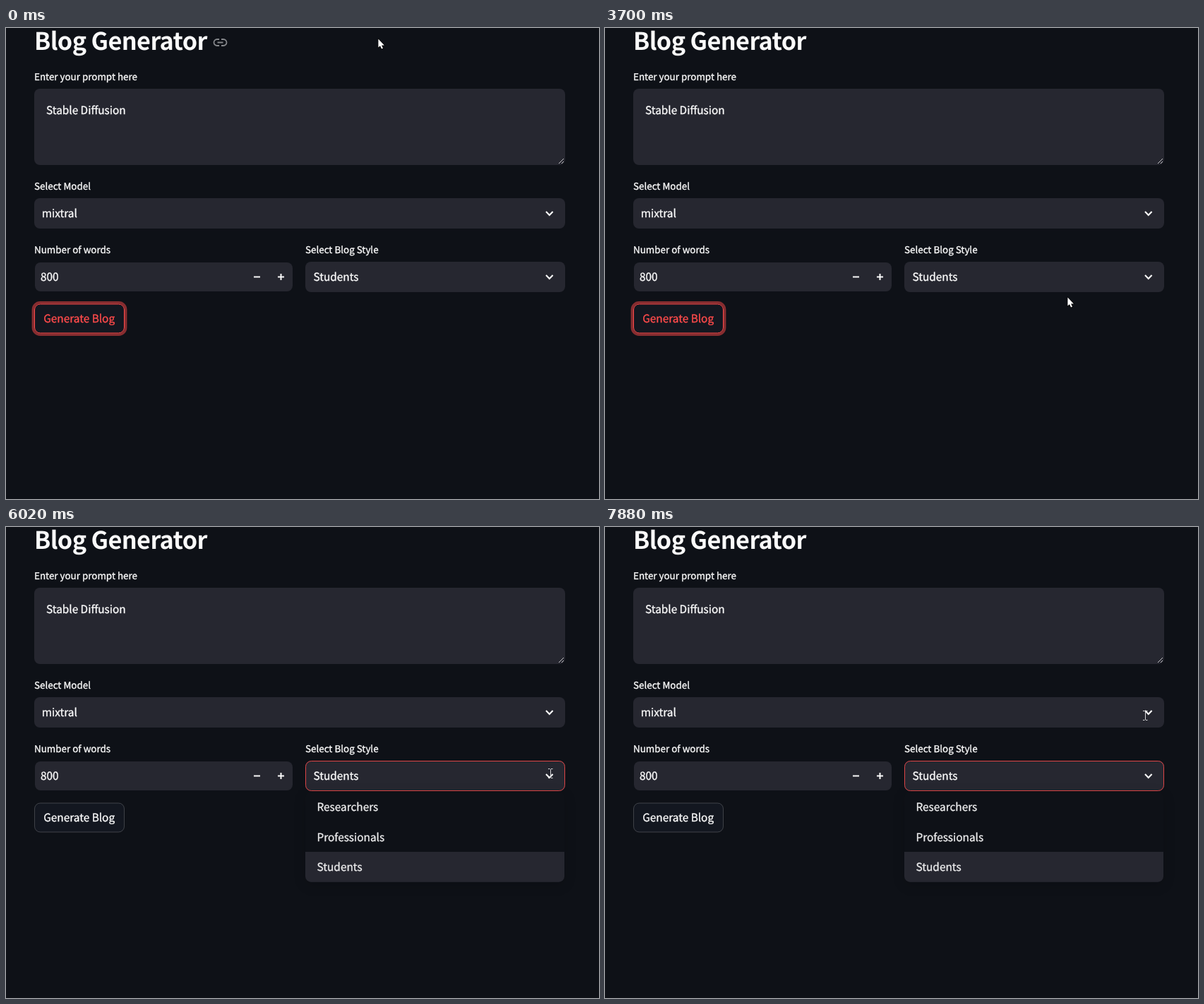
An HTML page with a canvas for the animation above (8 s loop, 840 by 667 pixels).

```html
<!DOCTYPE html>
<html lang="en">
<head>
<meta charset="utf-8">
<title>Blog Generator</title>
<style>
  html, body { margin: 0; width: 100%; height: 100%; overflow: hidden; background: #0e1117; }
  canvas { display: block; }
</style>
</head>
<body>
<canvas id="stage" width="840" height="667"></canvas>
<script>
const ctx = document.getElementById('stage').getContext('2d');
const LOOP = 8000, TICK = 66.25;
const BG = '#0e1117', FIELD = '#262730', WHITE = '#fafafa', RED = '#ff4b4b';
const FAMILY = '"Noto Sans CJK JP", "Noto Sans CJK SC", "Noto Sans CJK", "Open Sans", sans-serif';
const BODY = 15.36, LABEL = 13.42;
const LEFT = 40, RIGHT = 792, MIDDLE = 424, ROW = 43;
const OPEN = 82, CLICK = 95;

const prompt = { label: 'Enter your prompt here', value: 'Stable Diffusion', x: LEFT, y: 86, w: RIGHT - LEFT, h: 108, pad: 17 };
const model = { label: 'Select Model', value: 'mixtral', x: LEFT, y: 241, w: RIGHT - LEFT, h: ROW, pad: 10.8 };
const count = { label: 'Number of words', value: '800', x: LEFT, y: 331, w: 367, h: ROW, pad: 8.9, inset: 1 };
const style = { label: 'Select Blog Style', value: 'Students', x: MIDDLE, y: 331, w: RIGHT - MIDDLE, h: ROW, pad: 11.4 };
const fields = [prompt, model, count, style];

const HOME = { x: 527, y: 15 };
// Pointer moves in ticks; power above 1 slows down, below 1 speeds up
const MOVES = [
  { from: 2, to: 7, x: 940, y: 305, power: 0.7 },
  { from: 14, to: 18, x: 731, y: 322, power: 3 },
  { from: 21, to: 23, x: 722, y: 325, power: 1 },
  { from: 32, to: 39, x: 693, y: 397, power: 1.5 },
  { from: 54, to: 60, x: 610, y: 362, power: 1.5 },
  { from: 63, to: 72, x: 771, y: 349, power: 2.7 },
  { from: 96, to: 104, x: 338, y: 318, power: 2 },
  { from: 104, to: 106, x: 362, y: 319, power: 1 },
  { from: 106, to: 116, x: 765, y: 267, power: 2 }
];

const clamp = v => Math.min(1, Math.max(0, v));

function text(str, x, y, size = BODY, color = WHITE) {
  ctx.font = `400 ${size}px ${FAMILY}`;
  ctx.fillStyle = ctx.strokeStyle = color;
  ctx.lineWidth = 0.35;
  ctx.fillText(str, x, y);
  ctx.strokeText(str, x, y);
}

function title(str, x, y) {
  ctx.font = `700 34.2px ${FAMILY}`;
  ctx.letterSpacing = '-0.6px';
  ctx.fillStyle = WHITE;
  ctx.fillText(str, x, y);
  ctx.letterSpacing = '0px';
}

function box(x, y, w, h, fill, radius = 8) {
  ctx.beginPath();
  ctx.roundRect(x, y, w, h, radius);
  ctx.fillStyle = fill;
  ctx.fill();
}

function outline(x, y, w, h, color, width = 1, radius = 8) {
  ctx.beginPath();
  ctx.roundRect(x, y, w, h, radius);
  ctx.strokeStyle = color;
  ctx.lineWidth = width;
  ctx.stroke();
}

function line(d, color = WHITE, width = 2) {
  ctx.strokeStyle = color;
  ctx.lineWidth = width;
  ctx.stroke(new Path2D(d));
}

function drawField({ label, value, x, y, w, h, pad, inset = 0 }) {
  text(label, x, y - 12, LABEL);
  box(x + inset, y + inset, w - 2 * inset, h - 2 * inset, FIELD);
  text(value, x + pad, y + (h > ROW ? 36 : 27));
}

function chevron({ y }) {
  line(`M765 ${y + 19.1} l4.8 4.8 l4.8 -4.8`, WHITE, 2.1);
}

function form(tick) {
  title('Blog Generator', LEFT, 31);
  if (tick < 4) {
    line('M302 16 h-3 a4.5 4.5 0 0 0 0 9 h3 M305 16 h3 a4.5 4.5 0 0 1 0 9 h-3 M299.5 20.5 h8', '#85878b', 1.8);
  }
  fields.forEach(drawField);
  [model, style].forEach(chevron);
  line('M783 192 l7 -7 M787 192 l3 -3', '#c4c4c6', 1);
  line('M351 352.5 h9 M385 352.5 h9 M389.5 348 v9');
}

function button(focused) {
  if (focused) outline(38.3, 388.8, 131.4, 45.4, 'rgba(255,75,75,0.5)', 3.4, 10);
  box(40.5, 391, 127, 41, '#131720');
  outline(40.5, 391, 127, 41, focused ? RED : 'rgba(250,250,250,0.2)');
  text('Generate Blog', 53.2, 417, BODY, focused ? RED : WHITE);
}

function caretOn(tick) {
  const since = tick < CLICK ? tick - OPEN - 1 : tick - CLICK;
  return since < 0 || since % 16 < 8;
}

function menu(tick) {
  const shown = clamp((tick - OPEN) / 4);
  const { x, y, w, h } = style;
  ctx.globalAlpha = Math.min(0.85, 0.25 + shown);
  outline(x + 0.5, y + 0.5, w - 1, h - 1, RED);
  ctx.globalAlpha = 1;
  if (caretOn(tick)) {
    ctx.fillStyle = WHITE;
    ctx.fillRect(502, y + 11, 1.3, 22);
  }
  ctx.save();
  ctx.globalAlpha = shown;
  ctx.shadowColor = 'rgba(0,0,0,0.16)';
  ctx.shadowBlur = 17;
  ctx.shadowOffsetY = 4;
  box(x, 375, w - 1, 128, BG);
  ctx.shadowColor = 'transparent';
  box(x, 460, w - 1, 42.7, FIELD, [0, 0, 8, 8]);
  ['Researchers', 'Professionals', 'Students'].forEach((name, i) =>
    text(name, x + 16.5, Math.round(402 + i * 42.6), BODY, '#ebebec'));
  ctx.restore();
}

function pointerAt(tick) {
  let { x, y } = HOME;
  for (const m of MOVES) {
    const p = 1 - (1 - clamp((tick - m.from) / (m.to - m.from))) ** m.power;
    x += (m.x - x) * p;
    y += (m.y - y) * p;
  }
  return { x: Math.round(x), y: Math.round(y) };
}

function overField(p) {
  return fields.some(({ x, y, w, h }) => p.x > x && p.x < x + w && p.y > y && p.y < y + h);
}

function pointer(tick) {
  const p = pointerAt(tick);
  ctx.save();
  ctx.translate(p.x, p.y);
  if (overField(p)) {
    line('M-3 -6.5 h2.5 M1 -6.5 h2.5 M0.5 -6 v12 M-3 6.5 h2.5 M1 6.5 h2.5', '#d6d6d8', 1);
  } else {
    const arrow = 'M0.4 0.4 V12.6 L3 10.2 L5 14.6 L7 13.7 L5.1 9.4 H8.9 Z';
    line(arrow, '#000', 1.2);
    ctx.fillStyle = '#fff';
    ctx.fill(new Path2D(arrow));
  }
  ctx.restore();
}

function draw(now) {
  const tick = Math.floor((now % LOOP + 16) / TICK);
  ctx.fillStyle = BG;
  ctx.fillRect(0, 0, 840, 667);
  ctx.textRendering = 'geometricPrecision';
  form(tick);
  button(tick < OPEN);
  if (tick >= OPEN) menu(tick);
  pointer(tick);
}

let start;
function frame(now) {
  start ??= now;
  draw(Math.max(0, now - start));
  requestAnimationFrame(frame);
}
requestAnimationFrame(frame);
</script>
</body>
</html>
```
